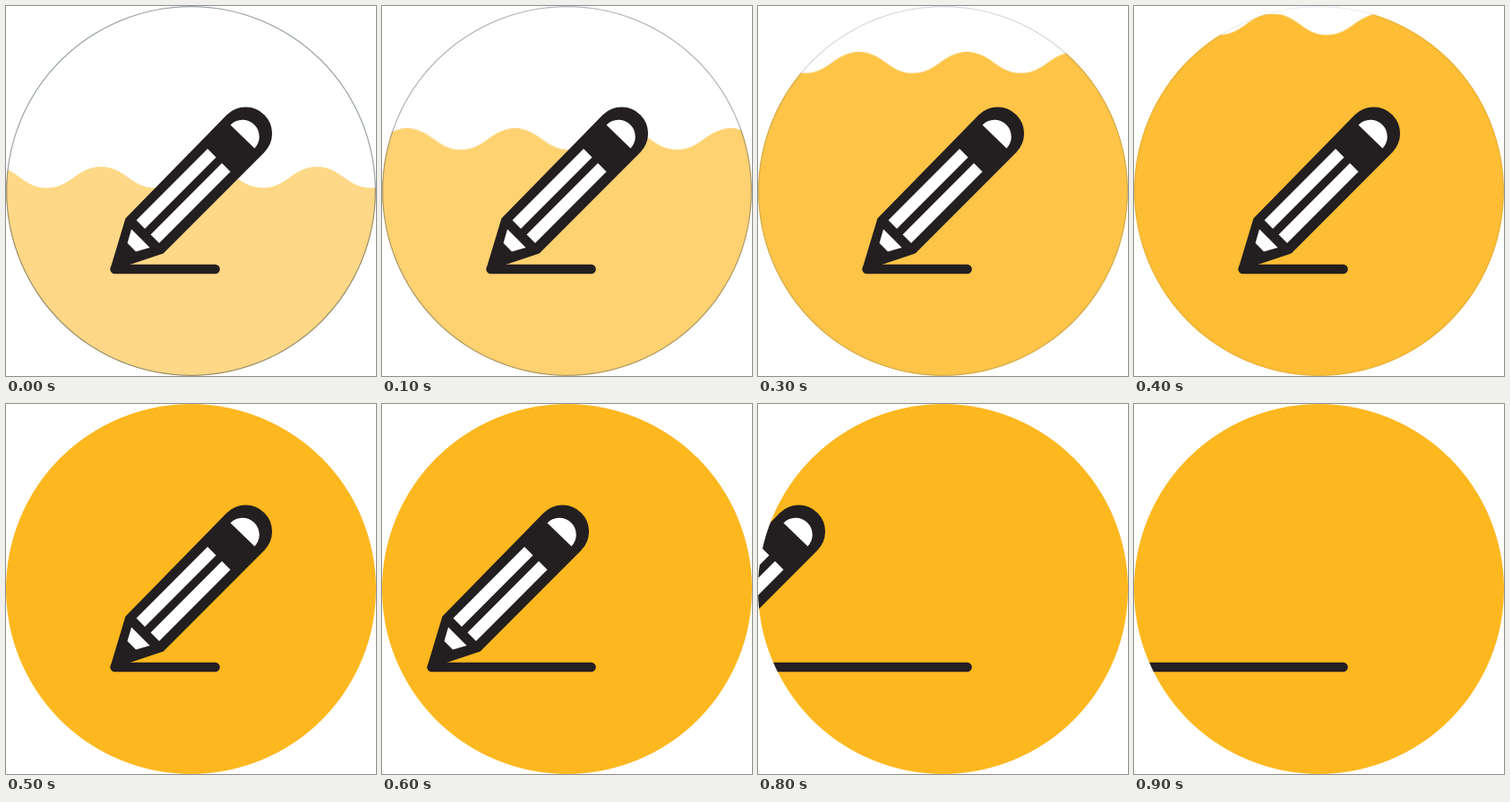
Animation, 413 px wide and 412 px high, one loop 1000 ms. Source, as an HTML page without scripts:

```html
<!DOCTYPE html>
<html lang="en">
<head>
<meta charset="utf-8">
<title>Pencil fill</title>
<style>
  @property --slide {
    syntax: "<length>";
    inherits: true;
    initial-value: 0px;
  }
  html, body {
    margin: 0;
    width: 100%;
    height: 100%;
    overflow: hidden;
    background: #fff;
  }
  svg { display: block; width: 100%; height: 100%; }

  .wave {
    fill: #fdb71f;
    animation: rise 1s infinite;
  }
  .rim {
    fill: none;
    stroke: #3a4c57;
    stroke-width: 1.6;
    animation: fade 1s infinite;
  }
  .icon {
    --ink: #231f20;
    animation: slide 1s step-end infinite;
  }
  .line {
    fill: none;
    stroke: var(--ink);
    stroke-width: 10.5;
    stroke-linecap: round;
    stroke-dasharray: 432 500;
    stroke-dashoffset: calc(320px + var(--slide));
  }
  .pencil { transform: translateX(var(--slide)); }
  .body {
    fill: var(--ink);
    stroke: var(--ink);
    stroke-width: 6;
    stroke-linejoin: round;
  }
  .lights { fill: #fff; }

  @keyframes rise {
    0% { transform: translate(0, 0); opacity: .54; animation-timing-function: steps(5); }
    50%, 100% { transform: translate(212px, -213px); opacity: 1; }
  }
  @keyframes fade {
    0% { opacity: .5; animation-timing-function: steps(5); }
    50%, 100% { opacity: 0; }
  }
  @keyframes slide {
    0% { --slide: 0px; }
    60% { --slide: -66px; }
    70% { --slide: -140px; }
    80% { --slide: -222px; }
    90%, 100% { --slide: -306px; }
  }
</style>
</head>
<body>
<svg viewBox="0 0 413 412">
  <clipPath id="disc"><ellipse cx="206.5" cy="206" rx="206.5" ry="206"/></clipPath>
  <g clip-path="url(#disc)">
    <path class="wave" d="M-255.5 179
      c27 0 33 23.5 60.25 23.5s33-23.5 60.25-23.5
      s33 23.5 60.25 23.5s33-23.5 60.25-23.5
      s33 23.5 60.25 23.5s33-23.5 60.25-23.5
      s33 23.5 60.25 23.5s33-23.5 60.25-23.5
      s33 23.5 60.25 23.5s33-23.5 60.25-23.5
      s33 23.5 60.25 23.5s33-23.5 60.25-23.5
      V640H-255.5z"/>
    <ellipse class="rim" cx="206.5" cy="206" rx="206" ry="205.5"/>
    <g class="icon">
      <path class="line" d="M233.5 293H-198.5"/>
      <g class="pencil">
        <path class="body" d="M248.8 123.2A26.5 26.5 0 0 1 286.2 160.8L174 273L120 291L136 238z"/>
        <g class="lights">
          <path d="M250.5 132.5A18.5 18.5 0 0 1 277.5 158.5z"/>
          <path d="M225 159l9.5 9.5l-79.5 79.5l-9.5-9.5z"/>
          <path d="M241 175l9.5 9.5l-79.5 79.5l-9.5-9.5z"/>
          <path d="M140 248.5L160.5 269L145 273.5L135.5 264z"/>
        </g>
      </g>
    </g>
  </g>
</svg>
</body>
</html>
```
